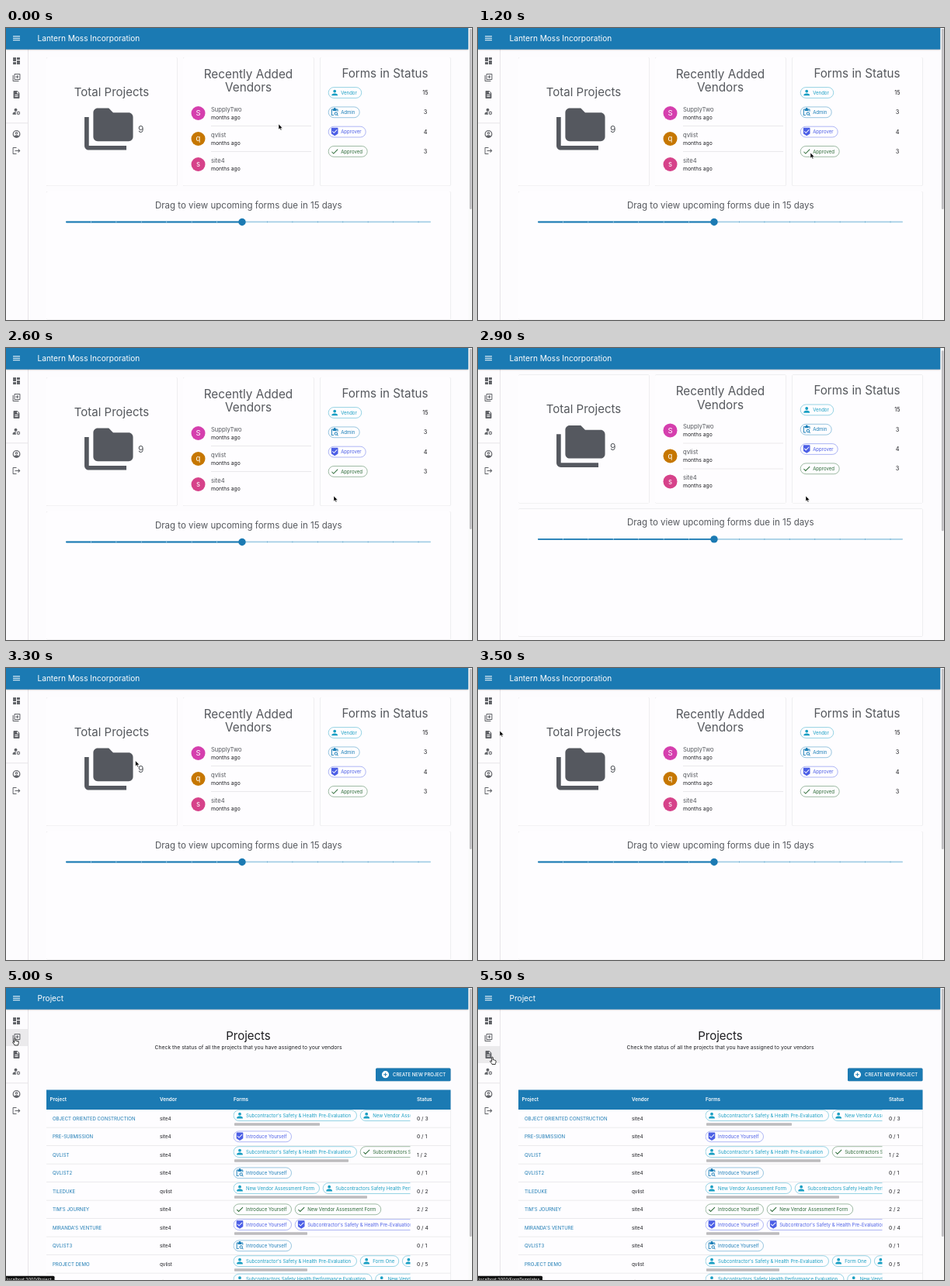
An HTML page for the animation above (5.6 s loop, 600 by 377 pixels).

```html
<!DOCTYPE html>
<html lang="en">
<head>
<meta charset="utf-8">
<title>Dashboard</title>
<style>
html, body { margin: 0; width: 100%; height: 100%; overflow: hidden; background: #fdfcfe; }
svg { display: block; width: 100%; height: 100%; font-family: Inter, "Open Sans", sans-serif; }
.card { filter: drop-shadow(0 .8px .35px rgba(0, 0, 0, .24)); }
.bar { filter: drop-shadow(0 .7px .8px rgba(0, 0, 0, .4)); }
</style>
</head>
<body>
<svg id="stage" viewBox="0 0 600 377"></svg>
<script>
const LOOP = 5600, STEP = 100;
const BLUE = '#1b7ab3', GREY = '#55585d', INK = '#1e1f23', PAPER = '#fefdff';

const ICONS = {
  menu: 'M3 18h18v-2H3zM3 13h18v-2H3zM3 6v2h18V6z',
  dashboard: 'M3 13h8V3H3zM3 21h8v-6H3zM13 21h8V11h-8zM13 3v6h8V3z',
  add: 'M4 6H2v14c0 1.1.9 2 2 2h14v-2H4zM20 2H8c-1.1 0-2 .9-2 2v12c0 1.1.9 2 2 2h12c1.1 0 2-.9 2-2V4c0-1.1-.9-2-2-2zm0 14H8V4h12zM13 14h2v-3h3V9h-3V6h-2v3h-3v2h3z',
  doc: 'M14 2H6c-1.1 0-2 .9-2 2v16c0 1.1.9 2 2 2h12c1.1 0 2-.9 2-2V8zm2 16H8v-2h8zm0-4H8v-2h8zm-3-5V3.5L18.5 9z',
  manage: 'M10 4a4 4 0 1 0 0 8 4 4 0 0 0 0-8zM10.7 13C7.6 12.9 5.3 13.7 3.4 14.8 2.5 15.3 2 16.3 2 17.4V20h9.3A7 7 0 0 1 10.7 13zM16 11h2v1.5l1.4.7 1.3-.8 1 1.7-1.2.9v2l1.2.9-1 1.7-1.3-.8-1.4.7V21h-2v-1.5l-1.4-.7-1.3.8-1-1.7 1.2-.9v-2l-1.2-.9 1-1.7 1.3.8 1.4-.7zm1 3a2 2 0 1 0 0 4 2 2 0 0 0 0-4z',
  account: 'M12 2a10 10 0 1 0 0 20 10 10 0 0 0 0-20zm0 2a8 8 0 0 1 6.1 13c-3.4-3-8.8-3-12.2 0A8 8 0 0 1 12 4zm0 2a3.5 3.5 0 1 0 0 7 3.5 3.5 0 0 0 0-7zm0 2a1.5 1.5 0 1 1 0 3 1.5 1.5 0 0 1 0-3z',
  logout: 'M17 7l-1.4 1.4 2.6 2.6H8v2h10.2l-2.6 2.6L17 17l5-5zM4 5h8V3H4c-1.1 0-2 .9-2 2v14c0 1.1.9 2 2 2h8v-2H4z',
  folders: 'M3 6H1v13c0 1.1.9 2 2 2h17v-2H3zM21 4h-7l-2-2H7c-1.1 0-2 .9-2 2v11c0 1.1.9 2 2 2h14c1.1 0 2-.9 2-2V6c0-1.1-.9-2-2-2z',
  person: 'M12 4a4 4 0 1 0 0 8 4 4 0 0 0 0-8zM12 14c-2.7 0-8 1.3-8 4v2h16v-2c0-2.7-5.3-4-8-4z',
  review: 'M5 5v14h5v2H5a2 2 0 0 1-2-2V5a2 2 0 0 1 2-2h4a3 3 0 0 1 6 0h4a2 2 0 0 1 2 2v5h-2V5h-2v3H7V5zM15.5 11a4.5 4.5 0 1 0 2.4 8.3l2.7 2.7 1.4-1.4-2.7-2.7A4.5 4.5 0 0 0 15.5 11zm0 2a2.5 2.5 0 1 1 0 5 2.5 2.5 0 0 1 0-5z',
  shield: 'M19 1H5c-1.1 0-2 .9-2 2v13c0 .7.35 1.3.9 1.7L12 23l8.1-5.3c.55-.4.9-1 .9-1.7V3c0-1.1-.9-2-2-2zm-9 15l-5-5 1.4-1.4L10 13.2l7.6-7.6L19 7z',
  check: 'M9 16.2L4.8 12l-1.4 1.4L9 19 21 7l-1.4-1.4z',
  plus: 'M12 2a10 10 0 1 0 0 20 10 10 0 0 0 0-20zm5 11h-4v4h-2v-4H7v-2h4V7h2v4h4z'
};

const rect = (x, y, w, h, fill, more = '') =>
  `<rect x="${x}" y="${y}" width="${w}" height="${h}" fill="${fill}" ${more}/>`;
const text = (x, y, size, s, fill = INK, more = '') =>
  `<text x="${x}" y="${y}" font-size="${size}" fill="${fill}" ${more}>${s.replace(/&/g, '&amp;')}</text>`;
const mid = (x, y, size, s, fill) => text(x, y, size, s, fill, 'text-anchor="middle"');
const icon = (name, cx, cy, size, fill) =>
  `<path transform="translate(${cx - size / 2} ${cy - size / 2}) scale(${size / 24})" fill="${fill}" fill-rule="evenodd" d="${ICONS[name]}"/>`;
const card = (x, y, w, h, fill = PAPER) => rect(x, y, w, h, fill, 'class="card" rx="1.5"');

const KINDS = {
  vendor: ['person', '#189fc3'],
  admin: ['review', '#1b7fb8'],
  approver: ['shield', '#4c5fe6'],
  approved: ['check', '#2a6a35']
};

function chip(kind, x, cy, w, label) {
  const [name, color] = KINDS[kind];
  return rect(x, cy - 6.9, w, 13.8, PAPER, `rx="6.9" stroke="${color}" stroke-width=".6" stroke-opacity=".75"`) +
    icon(name, x + 8, cy, 11.5, color) + text(x + 16, cy + 2.1, 6.05, label, color);
}

function dashboard() {
  let s = card(52, 38, 168.5, 165.8) + card(228, 38, 168.5, 165.8) + card(404.5, 38, 168, 165.8) + card(52, 211, 520.5, 165.2);
  s += mid(136, 88, 15, 'Total Projects', GREY) + icon('folders', 132.3, 132, 68.2, '#55585f') + text(170, 135.3, 12, '9', GREY);

  s += mid(312, 64.5, 15.3, 'Recently Added', GREY) + mid(312, 82.3, 15.3, 'Vendors', GREY);
  [['SupplyTwo', 'S', '#d53fae'], ['qvlist', 'q', '#c67700'], ['site4', 's', '#d6428a']].forEach(([name, letter, color], i) => {
    const y = 110 + 33 * i;
    s += `<circle cx="247.5" cy="${y}" r="9" fill="${color}"/>` + mid(247.5, y + 3.4, 9.5, letter, '#fff') +
      text(264, y - 2.3, 7.6, name, GREY) + text(264, y + 7.7, 6.8, 'months ago');
    if (i < 2) s += rect(264, y + 16.3, 129, .6, '#dcdbdd');
  });

  s += mid(488, 63.5, 15.2, 'Forms in Status', GREY);
  [['vendor', 'Vendor', 42.5, '15'], ['admin', 'Admin', 40, '3'], ['approver', 'Approver', 48, '4'], ['approved', 'Approved', 50, '3']].forEach(([kind, label, w, n], i) => {
    const y = 83.5 + 25.3 * i;
    s += chip(kind, 415.2, y, w, label) + mid(540, y + 2.6, 7.3, n);
  });

  s += mid(312.3, 233, 11.5, 'Drag to view upcoming forms due in 15 days', GREY);
  s += rect(77, 249.6, 470, 1.7, '#a3cee5', 'rx=".8"') + rect(77, 249.5, 227, 1.9, BLUE, 'rx=".8"');
  for (let i = 1; i < 15; i++) s += rect(76.6 + 32.43 * i, 249.7, .8, 1.5, i < 7 ? '#b9dcee' : '#5aa3cc');
  return s + `<circle cx="304" cy="250.5" r="4.7" fill="${BLUE}"/>`;
}

// Form label and the width of its chip
const FORMS = {
  intro: ['Introduce Yourself', 74.5],
  pre: ["Subcontractor's Safety & Health Pre-Evaluation", 158.5],
  fresh: ['New Vendor Assessment Form', 110.5],
  perf: ['Subcontractors Safety Health Performance Evaluation', 178],
  one: ['Form One', 49.5]
};

// Project, vendor, status, scroll bar width, then kind:form chips
const ROWS = [
  ['OBJECT ORIENTED CONSTRUCTION', 'site4', '0 / 3', 110, 'vendor:pre vendor:fresh'],
  ['PRE-SUBMISSION', 'site4', '0 / 1', 0, 'approver:intro'],
  ['QVLIST', 'site4', '1 / 2', 147, 'vendor:pre approved:perf'],
  ['QVLIST2', 'site4', '0 / 1', 0, 'admin:intro'],
  ['TILEDUKE', 'qvlist', '0 / 2', 171, 'vendor:fresh vendor:perf'],
  ["TIM'S JOURNEY", 'site4', '2 / 2', 0, 'approved:intro approved:fresh'],
  ["MIRANDA'S VENTURE", 'site4', '0 / 4', 94, 'approver:intro approver:pre'],
  ['QVLIST3', 'site4', '0 / 1', 0, 'admin:intro'],
  ['PROJECT DEMO', 'qvlist', '0 / 5', 94, 'vendor:pre vendor:one vendor:pre'],
  ['PROJECT TRIAL', 'site4', '0 / 2', 130, 'vendor:perf vendor:fresh']
];

function tableRows() {
  let cells = '', forms = '';
  ROWS.forEach(([project, vendor, status, bar, list], i) => {
    const y = 168.3 + 23.5 * i;
    cells += text(60, y + 2.2, 6.05, project, BLUE) + text(198, y + 2.2, 6.3, vendor) +
      text(529, y + 2.3, 6.7, status) + rect(52, y + 11.5, 520.5, .6, '#dfdee1');
    let x = 293;
    for (const item of list.split(' ')) {
      const [kind, key] = item.split(':'), [label, w] = FORMS[key];
      forms += chip(kind, x, y - (bar ? 3.7 : 0), w, label);
      x += w + 4.7;
    }
    if (bar) forms += rect(294, y + 6, bar, 3.4, '#bdbcbe', 'rx=".6"');
  });
  return cells + `<g clip-path="url(#forms)">${forms}</g>`;
}

function projects() {
  let s = mid(312, 67, 15, 'Projects', '#1d1d20') +
    mid(312, 79, 6.83, 'Check the status of all the projects that you have assigned to your vendors');
  s += card(476, 103.5, 96.5, 16.8, BLUE) + icon('plus', 488.5, 111.7, 11, '#fff') +
    text(498, 114, 6, 'CREATE NEW PROJECT', '#fff', 'font-weight="500"');
  s += card(52, 132, 520.5, 260) + rect(52, 131.5, 520.5, 25.5, BLUE);
  [[56.5, 'Project'], [198, 'Vendor'], [293, 'Forms'], [529, 'Status']].forEach(([x, label]) => {
    s += text(x, 146.2, 6.3, label, '#fff', 'font-weight="600"');
  });
  return s + `<g id="rows">${tableRows()}</g>`;
}

function sidebar() {
  const items = [['dashboard', 42.5], ['add', 64], ['doc', 86], ['manage', 107.8], ['account', 137], ['logout', 158.5]];
  return rect(0, 27, 28.5, 350, '#fdfcfe') + rect(28, 27, .7, 350, '#dddce0') +
    rect(0, 53, 28, 22, '#ebeaec', 'id="hover"') + rect(0, 122.5, 28, .7, '#dddce0') +
    items.map(([name, y]) => icon(name, 13.5, y, 11.8, '#606267')).join('');
}

document.getElementById('stage').innerHTML =
  `<defs><clipPath id="forms">${rect(292.5, 150, 228, 227, '#000')}</clipPath></defs>` +
  rect(0, 0, 600, 377, '#fdfcfe') +
  `<g id="home">${dashboard()}</g><g id="list">${projects()}</g>` + sidebar() +
  rect(0, 0, 595.5, 27.6, BLUE, 'class="bar"') + icon('menu', 13.5, 13.3, 12, '#fff') +
  text(40.5, 17, 10.1, '', '#fff', 'id="title"') +
  rect(595.5, 0, 4.5, 377, '#fafafa') + rect(596.9, 1, 2.8, 233, '#bfbec1', 'id="thumb" rx="1.3"') +
  `<g id="status">${rect(-2, 371.8, 64.5, 9, '#111', 'id="statusBox" rx="1.5"')}${text(1, 377.8, 5.35, '', '#fff', 'id="url"')}</g>` +
  `<path id="arrow" d="M0 0V7.1L1.6 5.6 2.7 8.1 3.9 7.6 2.8 5.2H5z" fill="#000" stroke="#fff" stroke-width=".5"/>` +
  `<path id="hand" d="M-.8 0C-.8-1 .8-1 .8 0V2.7C1.3 2.3 2.1 2.5 2.2 3.1 2.8 2.8 3.4 3 3.5 3.6 4.2 3.4 4.7 3.8 4.6 4.6 4.7 6.5 4 7 3.8 8.5H-.4C-.8 7-2.6 5.7-2.9 4.7-2.8 3.9-1.7 4-.8 5z" fill="#fff" stroke="#000" stroke-width=".8"/>`;

const $ = id => document.getElementById(id);
const show = (id, on) => $(id).setAttribute('display', on ? 'inline' : 'none');
const set = (id, name, value) => $(id).setAttribute(name, value);

// Each key: time, then values
const CURSOR = [[0, 351, 124], [600, 400, 138], [1200, 428, 161], [1900, 430, 170], [2500, 422, 191], [3000, 422, 191],
  [3500, 28, 81], [3600, 28, 80], [4100, 11, 63.5], [4900, 11, 63.5], [5500, 18.5, 90]];
const SCROLL = [[2600, 0], [2900, 3.6], [3100, 3.6], [3300, 0]];

function track(keys, t) {
  if (t <= keys[0][0]) return keys[0].slice(1);
  const i = keys.findIndex(k => k[0] > t);
  if (i < 0) return keys[keys.length - 1].slice(1);
  const a = keys[i - 1], b = keys[i];
  let p = (t - a[0]) / (b[0] - a[0]);
  p = p * p * (3 - 2 * p);
  return a.slice(1).map((v, n) => v + (b[n + 1] - v) * p);
}

function draw(time) {
  const t = Math.floor(time % LOOP / STEP) * STEP;
  const [x, y] = track(CURSOR, t), [scroll] = track(SCROLL, t);
  const onList = t >= 4800, loaded = t >= 4900, hovering = x < 27, onProject = y < 75;

  show('home', !onList);
  show('list', onList);
  show('rows', loaded);
  set('home', 'transform', `translate(0 ${-scroll})`);
  $('title').textContent = onList ? 'Project' : 'Lantern Moss Incorporation';

  show('thumb', !onList || loaded);
  set('thumb', 'y', 1 + scroll * .62);
  set('thumb', 'height', onList ? 320 : 233);

  show('hover', hovering);
  set('hover', 'y', onProject ? 53 : 75);
  show('status', hovering);
  $('url').textContent = 'localhost:3000/' + (onProject ? 'Project' : 'FormTemplates');
  set('statusBox', 'width', onProject ? 64.5 : 85);

  show('arrow', !hovering);
  show('hand', hovering);
  set(hovering ? 'hand' : 'arrow', 'transform', `translate(${x} ${y})`);
}

const start = performance.now();
(function tick() {
  draw(performance.now() - start);
  requestAnimationFrame(tick);
})();
</script>
</body>
</html>
```
